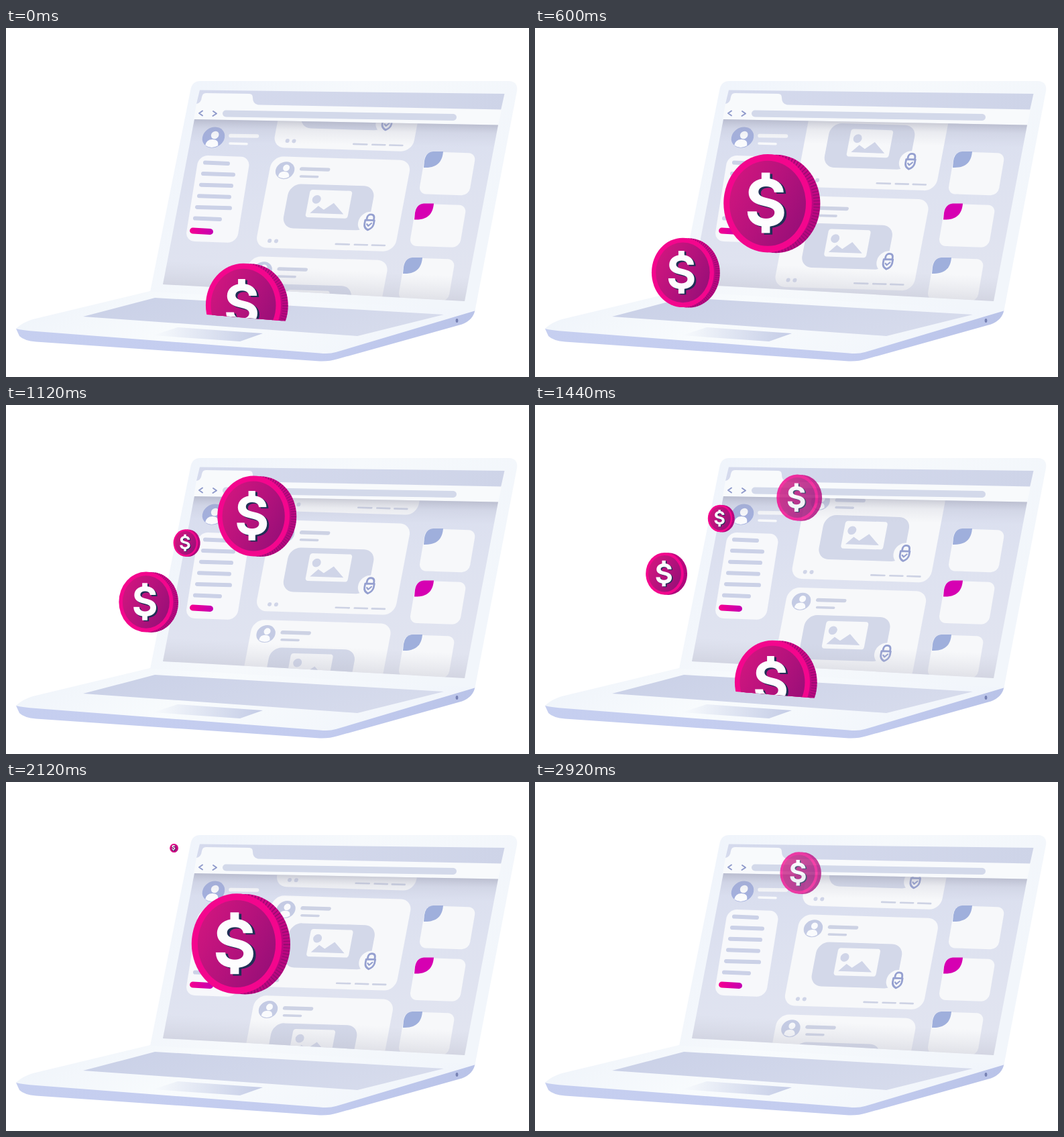
Recreate the animation shown at these times as an HTML page. Size 780 by 520 pixels, loop 2.96 s.

```html
<!DOCTYPE html>
<html lang="en">
<head>
<meta charset="utf-8">
<title>Laptop with coins</title>
<style>
  html, body { margin: 0; width: 100%; height: 100%; overflow: hidden; background: #fff; }
  svg { display: block; width: 780px; height: 520px; }
  .round { fill: none; stroke-linecap: round; stroke-linejoin: round; }
  .letter { font: 700 130px Inter, "Liberation Sans", sans-serif; text-anchor: middle; }
</style>
</head>
<body>
<svg viewBox="0 0 780 520">
  <defs>
    <linearGradient id="lid" x1="0" y1="0" x2="1" y2="0.4">
      <stop offset="0" stop-color="#eef3fb"/><stop offset="0.5" stop-color="#f6f9fc"/><stop offset="1" stop-color="#f2f6fb"/>
    </linearGradient>
    <linearGradient id="deck" x1="0" y1="0" x2="1" y2="0.2">
      <stop offset="0" stop-color="#eef3fa"/><stop offset="0.45" stop-color="#f8fbfd"/><stop offset="1" stop-color="#f1f5fb"/>
    </linearGradient>
    <linearGradient id="lip" x1="0" y1="0" x2="1" y2="0">
      <stop offset="0" stop-color="#c6cff0"/><stop offset="0.65" stop-color="#c3ccef"/><stop offset="1" stop-color="#b9c3e8"/>
    </linearGradient>
    <linearGradient id="keys" x1="0" y1="0" x2="1" y2="0.3">
      <stop offset="0" stop-color="#c9d0e7"/><stop offset="1" stop-color="#d6dbec"/>
    </linearGradient>
    <linearGradient id="pad" x1="0" y1="0" x2="1" y2="0">
      <stop offset="0" stop-color="#c4cce6" stop-opacity="0"/><stop offset="1" stop-color="#c4cce6"/>
    </linearGradient>
    <linearGradient id="bar" x1="0" y1="0" x2="1" y2="0">
      <stop offset="0" stop-color="#d5daed"/><stop offset="1" stop-color="#ced4e8"/>
    </linearGradient>
    <linearGradient id="screen" x1="0" y1="0" x2="0.25" y2="1">
      <stop offset="0" stop-color="#d7dcee"/><stop offset="0.55" stop-color="#dee2f0"/><stop offset="1" stop-color="#e1e4f0"/>
    </linearGradient>
    <linearGradient id="topShade" gradientUnits="userSpaceOnUse" x1="500" y1="140" x2="499.4" y2="174">
      <stop offset="0" stop-color="#9698ab" stop-opacity="0.46"/><stop offset="0.4" stop-color="#a8aabc" stop-opacity="0.17"/><stop offset="1" stop-color="#b0b2c4" stop-opacity="0"/>
    </linearGradient>
    <linearGradient id="lowShade" gradientUnits="userSpaceOnUse" x1="460" y1="395" x2="462" y2="358">
      <stop offset="0" stop-color="#b9bac8" stop-opacity="0.36"/><stop offset="1" stop-color="#c4c6d4" stop-opacity="0"/>
    </linearGradient>
    <linearGradient id="pill" gradientUnits="userSpaceOnUse" x1="274" y1="0" x2="309" y2="0">
      <stop offset="0" stop-color="#f5008f"/><stop offset="1" stop-color="#c400b2"/>
    </linearGradient>
    <linearGradient id="face" x1="0" y1="0.1" x2="1" y2="0.7">
      <stop offset="0" stop-color="#d3167f"/><stop offset="0.55" stop-color="#b5127c"/><stop offset="1" stop-color="#990f78"/>
    </linearGradient>
    <linearGradient id="edge" x1="0" y1="0" x2="1" y2="1">
      <stop offset="0" stop-color="#e8058c"/><stop offset="1" stop-color="#ac087d"/>
    </linearGradient>

    <clipPath id="view"><path d="M281 136L734 144.5L684 407L234 382Z"/></clipPath>
    <clipPath id="slot"><path d="M0 0H780V466.9L0 402.2Z"/></clipPath>

    <g id="person" fill="#fafbfd">
      <circle cx="1.5" cy="-4.5" r="5.8"/>
      <path d="M-10 11Q-10 2 -.5 2Q9 2 9 11Q0 17 -10 11Z"/>
    </g>

    <g id="card" transform="matrix(1 .03 -.19 1 0 0)">
      <rect width="208" height="136" rx="17" fill="#f7f8fa"/>
      <ellipse cx="23" cy="20.5" rx="14" ry="13" fill="#c4cbe4"/>
      <use href="#person" transform="translate(23 20.5) scale(.85)"/>
      <g class="round" stroke="#cdd2e4">
        <path d="M47 17.5H87" stroke-width="5.4"/>
        <path d="M48 28.500H73" stroke-width="3.6"/>
        <path d="M119 127.3H139M147 127.3H166M173 127.3H192" stroke-width="2.6"/>
      </g>
      <rect x="34" y="40" width="128" height="66" rx="17" fill="#d3d8e9"/>
      <rect x="66" y="48" width="63" height="41" rx="4" fill="#f7f8fa"/>
      <g fill="#d0d5e8">
        <circle cx="78" cy="62" r="6.4"/>
        <path d="M72 82.5L82.4 71.5L91.5 77L104.5 66.5L122 82.8Z"/>
        <circle cx="20" cy="125.5" r="3"/><circle cx="29.8" cy="125.5" r="3"/>
      </g>
      <circle cx="162" cy="94" r="16" fill="#f7f8fa"/>
      <g class="round" stroke="#95a0d0" stroke-width="2.8">
        <path d="M158 89V86.500Q158.500 82 163 82Q168 82 168.500 87V89"/>
        <path d="M156 90.500H169.500V96.500Q169 102 162.500 105Q156 102 156 96Z"/>
        <path d="M159.500 96.500L162 99L166 95" stroke-width="2.200"/>
      </g>
    </g>

    <g id="tile">
      <rect width="75" height="63" rx="11" fill="#f7f8fa" transform="matrix(1 .035 -.17 1 -1 0)"/>
      <path d="M25 0H10Q-1 1 -3 14L-4 24C18 25 24 13 25 0Z"/>
    </g>

    <!-- dollar sign whose bar stops at the letter -->
    <g id="dollar">
      <text class="letter" y="47">S</text>
      <path d="M-8.500 -61h17v18h-17zM-8.500 43h17v18h-17z"/>
    </g>

    <g id="coin">
      <ellipse cx="9" cy="1" rx="89" ry="99" fill="url(#edge)"/>
      <ellipse cx="9" cy="1" rx="82" ry="92" fill="none" stroke="#930b70" stroke-width="13" stroke-dasharray="1.8 4.4"/>
      <ellipse cx="-8" rx="89" ry="99" fill="#f3068d"/>
      <ellipse cx="-8" rx="77" ry="86" fill="url(#face)"/>
      <use href="#dollar" x="-7" y="2" fill="#1f2f56"/>
      <use href="#dollar" x="-12" y="-1" fill="#fdfdfe"/>
    </g>
  </defs>

  <!-- laptop -->
  <path fill="url(#lip)" d="M15 448L20 459Q27 466 45 467.500L468 496.500Q482 497 495 493L680 441.500Q697 435 699.500 420Z"/>
  <path fill="url(#deck)" d="M14.500 448Q26 438 40 434L215 392L700 419L699 421.500L492 483Q482 486 468 484.500L45 452Q25 450.500 14.500 448Z"/>
  <path fill="url(#lid)" d="M275.500 91Q278 79 290 79H750Q764 80 762 94L699.500 421L215 393Z"/>
  <path fill="url(#keys)" d="M222 402L653 427L524 459L115 430Z"/>
  <path fill="url(#pad)" d="M256 446L383 455L349 467L219 458Z"/>
  <ellipse cx="672.500" cy="436" rx="1.900" ry="3" fill="#7681b3"/>

  <!-- browser frame -->
  <path fill="url(#bar)" d="M289 92.500L743.500 98L738 122.500L284 113Z"/>
  <path fill="#f8fafc" d="M284 113Q291 112 292 103Q293 97 298 97L363 98Q368 98 368 104Q368 113 376 114.500L739 121.500L734 145L280 136Z"/>
  <g class="round">
    <path stroke="#d3d9ea" stroke-width="10" d="M328 127.500L667 133"/>
    <path stroke="#8f9acb" stroke-width="2" d="M293 123.500L288 127L293 130.500M309 124L314 127.500L308.500 131"/>
  </g>

  <!-- page -->
  <g clip-path="url(#view)">
    <path fill="url(#screen)" d="M230 130H740V410H230Z"/>
    <g transform="matrix(1 .03 -.19 1 309.500 163)">
      <ellipse rx="16.500" ry="15.500" fill="#a3afdd"/>
      <use href="#person" y="1"/>
    </g>
    <g class="round" stroke="#f8f9fb">
      <path d="M335 160.500L374.500 161" stroke-width="5.600"/>
      <path d="M334 172L359 172.800" stroke-width="3.600"/>
    </g>
    <rect width="77" height="128" rx="14" fill="#f7f8fb" transform="matrix(1 .035 -.16 1 287.500 189.500)"/>
    <g id="menu" class="round" stroke="#cbd1e7" stroke-width="6"></g>
    <path class="round" stroke="url(#pill)" stroke-width="9" d="M278.500 302L304.500 303.500"/>
    <use href="#tile" x="627" y="184" fill="#9fafdc"/>
    <use href="#tile" x="613" y="261.500" fill="#d600b2"/>
    <use href="#tile" x="596" y="342" fill="#9fafdc"/>
    <g id="feed"></g>
    <path fill="url(#topShade)" d="M230 130H740V185H230Z"/>
    <path fill="url(#lowShade)" d="M230 340H740V410H230Z"/>
  </g>

  <g id="small"></g>
  <g id="large" clip-path="url(#slot)"></g>
</svg>

<script>
const LOOP = 2960, CARD_STEP = 149, SLANT = 0.198;
const $ = id => document.getElementById(id);

function add(parent, tag, attrs) {
  const el = document.createElementNS("http://www.w3.org/2000/svg", tag);
  for (const k in attrs) el.setAttribute(k, attrs[k]);
  return parent.appendChild(el);
}

// Sidebar lines: only their lengths vary
[34, 45, 45, 45, 49, 37].forEach((len, i) => {
  const x = 297 - 3 * i, y = 200.5 + 16.6 * i;
  add($("menu"), "path", { d: `M${x} ${y}l${len} 1.4` });
});

// Three cards repeat, each with its own small sideways offset
const nudge = [0, -4, -3];
for (let k = -1; k < 5; k++) {
  add($("feed"), "use", {
    href: "#card",
    x: 397 - SLANT * CARD_STEP * k + nudge[(k + 3) % 3],
    y: 191 + CARD_STEP * k
  });
}

// Paths as [time, x, y, radius]
const rise = [
  [-320, 338, 492, 52], [0, 359, 413, 63], [280, 371, 341, 68.5], [360, 365.5, 324, 68.8],
  [680, 350, 241, 75.5], [800, 352.5, 216.5, 76.5], [1120, 374, 165.5, 60.5],
  [1480, 396, 135.5, 31.5], [1720, 402, 128, 12], [1840, 404, 126, 2]
];
const left = [
  [200, 212, 430, 4], [360, 219.5, 397.5, 34.5], [560, 224, 370, 50], [800, 225.5, 336, 58.8],
  [1120, 212.5, 293.5, 45.5], [1720, 181.5, 215.5, 18.5], [2000, 170, 185, 0]
];
const drift = [
  [740, 238, 238, 0], [800, 244, 234, 6.5], [1120, 269.5, 205.5, 20.5],
  [1720, 277, 137, 17], [2120, 250.5, 98.5, 6.5], [2260, 243, 90, 0]
];

const clamp = v => Math.max(0, Math.min(1, v));
const fadeOut = t => clamp(1 - (t - 1300) / 540) ** 0.7;

const coins = [
  { path: rise, delay: 0, layer: "large", alpha: fadeOut },
  { path: rise, delay: 1440, layer: "large", alpha: fadeOut },
  { path: left, delay: 0, layer: "small" },
  { path: left, delay: 1980, layer: "small", size: t => clamp((820 - t) / 120) },
  { path: drift, delay: 0, layer: "small" }
];
for (const c of coins) c.el = add($(c.layer), "use", { href: "#coin" });

function slope(path, i, c) {
  const a = path[Math.max(0, i - 1)], b = path[Math.min(path.length - 1, i + 1)];
  return (b[c] - a[c]) / (b[0] - a[0]);
}

// Cubic Hermite curve through the path's points
function sample(path, t) {
  const i = path.findIndex((p, n) => n < path.length - 1 && t >= p[0] && t < path[n + 1][0]);
  if (i < 0) return null;
  const a = path[i], b = path[i + 1], d = b[0] - a[0], u = (t - a[0]) / d, v = 1 - u;
  return [1, 2, 3].map(c =>
    v * v * (1 + 2 * u) * a[c] + u * u * (3 - 2 * u) * b[c] +
    u * v * d * (v * slope(path, i, c) - u * slope(path, i + 1, c)));
}

function draw(now) {
  const t = now % LOOP, shift = 3 * CARD_STEP * t / LOOP;
  $("feed").setAttribute("transform", `translate(${SLANT * shift} ${-shift})`);
  for (const { path, delay, alpha, size, el } of coins) {
    const local = t - delay, p = sample(path, local);
    const r = p ? p[2] * (size ? size(local) : 1) : 0;
    el.style.display = r > 0.3 ? "" : "none";
    if (r <= 0.3) continue;
    el.setAttribute("transform", `translate(${p[0]} ${p[1]}) scale(${r / 100})`);
    el.setAttribute("opacity", alpha ? alpha(local) : 1);
  }
}

let start;
function tick(now) {
  start ??= now;
  draw(now - start);
  requestAnimationFrame(tick);
}
draw(0);
requestAnimationFrame(tick);
</script>
</body>
</html>
```
